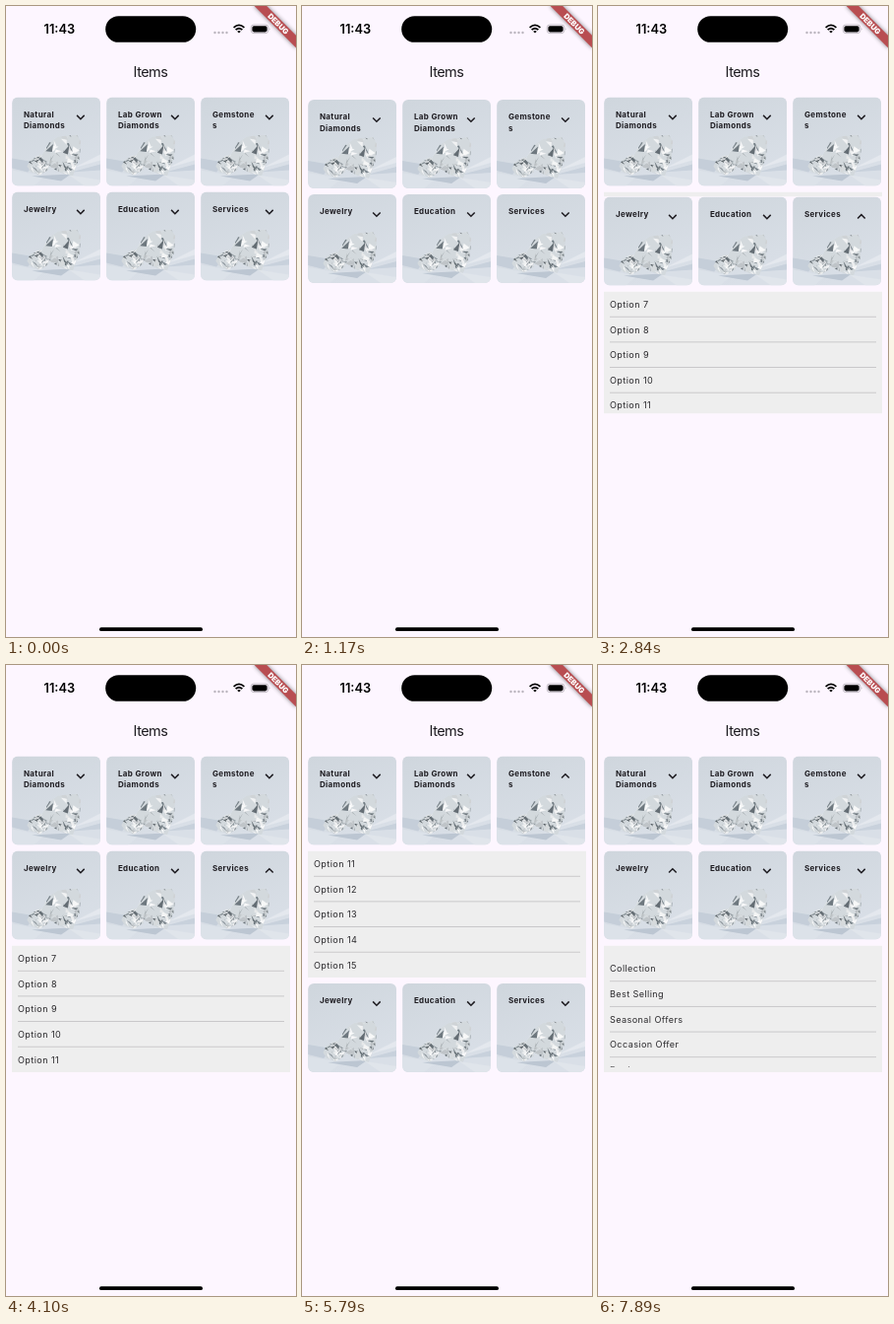
These frames come from a looping animation (295 by 640 pixels, 8 s). An HTML page:

```html
<!DOCTYPE html>
<html lang="en">
<head>
<meta charset="utf-8">
<title>Items</title>
<style>
  html, body { margin: 0; width: 100%; height: 100%; overflow: hidden; background: #fdf6ff; }
  svg { display: block; }
  text { font-family: Inter, Roboto, sans-serif; fill: #1d1b20; }
  .clock { font-size: 12.8px; font-weight: 600; text-anchor: middle; fill: #000; }
  .title { font-size: 14.5px; letter-spacing: -.55px; text-anchor: middle; }
  .label { font-size: 8px; font-weight: 700; letter-spacing: .36px; }
  .option { font-size: 9.1px; letter-spacing: .4px; fill: #2b2a2d; }
  .debug { font-size: 7.6px; font-weight: 900; text-anchor: middle; fill: #fff; }
  .ribbon { filter: drop-shadow(0 0 2px rgba(0, 0, 0, .5)); }
  .chevron { fill: none; stroke: #1d1b20; stroke-width: 1.5; }
</style>
</head>
<body>
<svg width="295" height="640" viewBox="0 0 295 640">
  <defs>
    <linearGradient id="wall" x1="0" y1="0" x2=".4" y2="1">
      <stop offset="0" stop-color="#cfd6dd"/>
      <stop offset="1" stop-color="#d9dfe7"/>
    </linearGradient>
    <clipPath id="round"><rect width="90" height="90" rx="6"/></clipPath>
    <g id="photo" clip-path="url(#round)">
      <rect width="90" height="90" fill="url(#wall)"/>
      <path d="M0 62L24 66L16 76L0 72Z" fill="#c5ced9"/>
      <path d="M0 74L34 80L22 90H0Z" fill="#dce2e9"/>
      <path d="M62 72L90 58V64Z" fill="#e4e8ee"/>
      <path d="M60 76L90 68V74Z" fill="#c8d1dc"/>
      <path d="M58 79L90 84V90H74Z" fill="#e0e5eb"/>
      <path d="M20 80L60 78L50 85Z" fill="#bcc6d2"/>
    </g>
  </defs>

  <rect width="295" height="640" fill="#fdf6ff"/>
  <g id="page"></g>

  <text class="title" x="147" y="72">Items</text>
  <text class="clock" x="54.3" y="28">11:43</text>
  <rect x="101.2" y="10.2" width="92" height="26.6" rx="13.3"/>
  <path d="M212.5 27h13" stroke="#bbb5be" stroke-width="2.4" stroke-linecap="round" stroke-dasharray="0 4"/>
  <g fill="none" stroke="#000" stroke-width="1.8">
    <path d="M231.6 21.8Q237 17 242.4 21.8"/>
    <path d="M233.6 24.2Q237 21.2 240.4 24.2"/>
  </g>
  <path d="M235.2 25.7Q237 24.2 238.8 25.7L237 27.6Z"/>
  <rect x="249.2" y="19" width="17.6" height="8.6" rx="2.8" fill="none" stroke="#a9a4ac" stroke-width=".7"/>
  <rect x="250.4" y="20.2" width="15.2" height="6.2" rx="1.8"/>
  <path d="M267.8 21.9Q269.2 23.3 267.8 24.7Z" fill="#a9a4ac"/>
  <g transform="translate(295) rotate(45)">
    <rect class="ribbon" x="-30" y="21" width="60" height="9" fill="#b84d51"/>
    <text class="debug" x="0" y="28.3">DEBUG</text>
  </g>
  <rect x="95" y="630.3" width="105" height="3.7" rx="1.85"/>
</svg>

<script>
const LOOP = 8000, TICK = 112;
const STEP = 96, LEFT = 6, TOP = 92.5;
const PANEL = 128.5, PANEL_W = 283, PITCH = 25.65;
const CHEVRON = { down: 'M66 18.4l3.8 3.8l3.8-3.8', up: 'M66 22l3.8-3.8l3.8 3.8' };

const numbered = first => Array.from({ length: 5 }, (_, i) => `Option ${first + i}`);
const categories = [
  { lines: ['Natural', 'Diamonds'], options: numbered(1) },
  { lines: ['Lab Grown', 'Diamonds'] },
  { lines: ['Gemstone', 's'], options: numbered(11) },
  { lines: ['Jewelry'], options: ['Collection', 'Best Selling', 'Seasonal Offers', 'Occasion Offer', 'Deals'] },
  { lines: ['Education'] },
  { lines: ['Services'], options: numbered(7) },
];

// A drag pulls its content by `size` and springs back; a higher `snap` peaks earlier.
const pageDrag = { start: 840, ticks: 6, size: 13.7, snap: 3.3 };
const openings = [
  { cat: 0, start: 1760, drags: [] },
  { cat: 5, start: 2720, drags: [{ start: 3310, ticks: 8, size: -20, snap: 2 }] },
  { cat: 2, start: 4270, drags: [{ start: 4920, ticks: 8, size: -20, snap: 2 }] },
  { cat: 3, start: 6460, drags: [
    { start: 6880, ticks: 8, size: -20.3, snap: 1 },
    { start: 7780, ticks: 8, size: 14, snap: 1 },
  ] },
];

const ticksSince = (start, t) => Math.max(0, Math.floor((t - start + 20) / TICK) + 1);
const easeOut = x => 1 - (1 - x) ** 3;
const rowOf = cat => Math.floor(cat / 3);

function pull({ start, ticks, size, snap }, t) {
  const bump = x => x * (1 - x) ** snap;
  const x = Math.min(1, ticksSince(start, t) / ticks);
  return size * bump(x) / bump(1 / (1 + snap));
}

function add(parent, tag, attrs = {}, text) {
  const node = document.createElementNS('http://www.w3.org/2000/svg', tag);
  for (const key in attrs) node.setAttribute(key, attrs[key]);
  if (text) node.textContent = text;
  parent.append(node);
  return node;
}

let seed = 7;
const random = () => (seed = seed * 16807 % 2147483647) / 2147483647;

// Random slivers clipped to the outline give the glitter of cut facets.
function gem(parent, id, outline, cx, cy, radius) {
  add(add(parent, 'clipPath', { id }), 'path', { d: outline });
  const body = add(parent, 'g', { 'clip-path': `url(#${id})` });
  add(body, 'path', { d: outline, fill: '#d3d9dd' });
  for (let i = 0; i < radius * 4; i++) {
    const x = cx + (random() * 2 - 1) * radius, y = cy + (random() * 2 - 1) * radius;
    const near = () => `${x + (random() - .5) * 11} ${y + (random() - .5) * 11}`;
    const light = 98 - 68 * random() ** 2;
    add(body, 'path', { d: `M${near()}L${near()}L${near()}Z`, fill: `hsl(205 7% ${light}%)` });
  }
}

const photo = document.getElementById('photo');
gem(photo, 'small', 'M15 70L19 63L29 58L37 63L38 73L28 79L19 76Z', 27, 69, 12);
gem(photo, 'large', 'M29 61L38 46L47 40L66 38L70 45L69 61L62 80L50 77L38 70Z', 51, 59, 22);

const page = document.getElementById('page');
const rows = [add(page, 'g'), add(page, 'g')];

categories.forEach((cat, i) => {
  const card = add(rows[rowOf(i)], 'g', { transform: `translate(${LEFT + i % 3 * STEP + .1})` });
  add(card, 'use', { href: '#photo' });
  cat.lines.forEach((line, k) => add(card, 'text', { class: 'label', x: 11.8, y: 20.1 + k * 11.7 }, line));
  cat.chevron = add(card, 'path', { class: 'chevron' });
  if (!cat.options) return;

  cat.panel = add(page, 'svg', { x: LEFT, width: PANEL_W, height: PANEL });
  add(cat.panel, 'rect', { width: PANEL_W, height: PANEL, fill: '#eeeeee' });
  const view = add(cat.panel, 'svg', { y: 6, width: PANEL_W, height: 117.3 });
  cat.list = add(view, 'g');
  cat.options.forEach((option, k) => {
    const y = k * PITCH;
    add(cat.list, 'text', { class: 'option', x: 6, y: y + 10.4 }, option);
    if (k < cat.options.length - 1)
      add(cat.list, 'rect', { x: 6, y: y + 19.3, width: 271, height: .9, fill: '#c6c5c7' });
  });
});

function render(t) {
  const now = openings.findLastIndex(o => t >= o.start);
  const current = openings[now], previous = openings[now - 1];
  const amount = categories.map(() => 0);
  if (current) {
    const grown = easeOut(Math.min(1, ticksSince(current.start, t) / 3));
    const shift = current.drags.reduce((sum, drag) => sum + pull(drag, t), 0);
    amount[current.cat] = grown;
    if (previous) amount[previous.cat] = 1 - grown;
    categories[current.cat].list.setAttribute('transform', `translate(0 ${shift})`);
  }

  const upper = Math.max(...amount.slice(0, 3));
  const tops = [TOP, TOP + STEP + upper * (PANEL + 6)];
  page.setAttribute('transform', `translate(0 ${pull(pageDrag, t)})`);
  rows.forEach((row, r) => row.setAttribute('transform', `translate(0 ${tops[r]})`));

  categories.forEach((cat, i) => {
    cat.chevron.setAttribute('d', current && current.cat === i ? CHEVRON.up : CHEVRON.down);
    if (!cat.panel) return;
    cat.panel.style.display = amount[i] ? '' : 'none';
    cat.panel.setAttribute('y', tops[rowOf(i)] + STEP);
    cat.panel.setAttribute('height', PANEL * amount[i]);
  });
}

const start = performance.now();
function tick() {
  render((performance.now() - start) % LOOP);
  requestAnimationFrame(tick);
}
tick();
</script>
</body>
</html>
```
